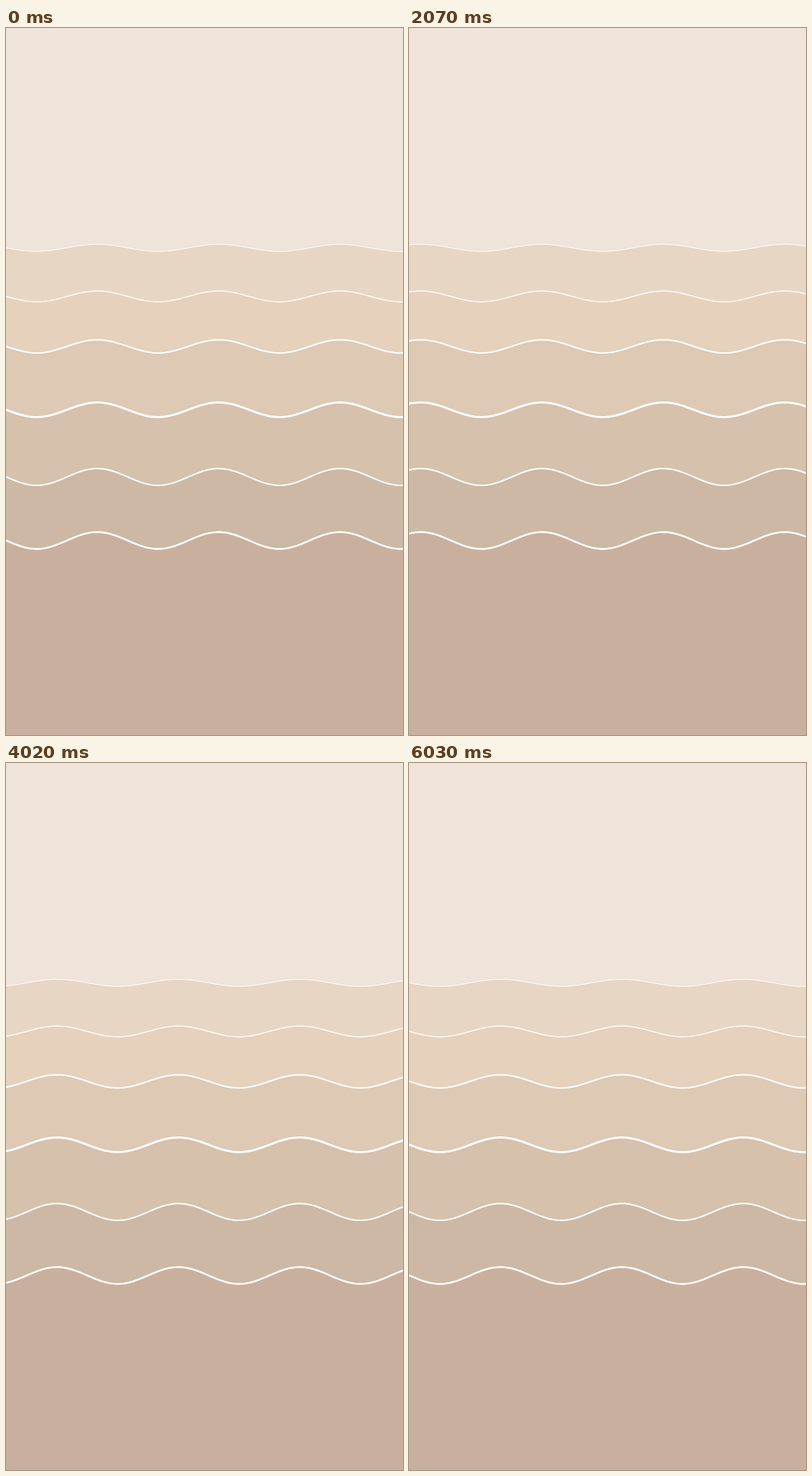
An HTML page for the animation above (6.06 s loop, 540 by 960 pixels).

```html
<!DOCTYPE html>
<html lang="en">
<head>
<meta charset="utf-8">
<title>Sand waves</title>
<style>
  html, body { margin: 0; width: 100%; height: 100%; overflow: hidden; background: #efe3da; }
  svg { display: block; width: 100%; height: 100%; }
</style>
</head>
<body>
<svg id="stage" viewBox="0 0 540 960" preserveAspectRatio="none"></svg>
<script>
const WIDTH = 540, HEIGHT = 960;
const LOOP = 6060, STEP = 30;
const WAVELENGTH = 165.1, FIRST_CREST = 124.2, SPEED = 0.02742;

const layers = [
  { y: 298.5, amp: 4.8,  line: 1,   fill: '#e8d6c4' },
  { y: 364.5, amp: 7.3,  line: 1.4, fill: '#e5d1bc' },
  { y: 432.3, amp: 8.9,  line: 2,   fill: '#ddc9b4' },
  { y: 518.4, amp: 9.9,  line: 2.8, fill: '#d5c1ac' },
  { y: 609.6, amp: 11.4, line: 2,   fill: '#ccb8a4' },
  { y: 695.9, amp: 11.4, line: 2.4, fill: '#c9b09e' }
];

const stage = document.getElementById('stage');

function addPath(attrs) {
  const path = document.createElementNS('http://www.w3.org/2000/svg', 'path');
  for (const name in attrs) path.setAttribute(name, attrs[name]);
  return stage.appendChild(path);
}

for (const layer of layers) {
  layer.area = addPath({ fill: layer.fill });
  layer.crest = addPath({ fill: 'none', stroke: '#fff', 'stroke-width': layer.line });
}

function wavePath({ y, amp }, shift) {
  const points = [];
  for (let x = -6; x <= WIDTH + 6; x += 3) {
    const phase = (x - FIRST_CREST - shift) / WAVELENGTH * 2 * Math.PI;
    points.push(x + ' ' + (y - amp * Math.cos(phase)).toFixed(2));
  }
  return 'M' + points.join('L');
}

function draw(time) {
  const shift = Math.floor((time % LOOP) / STEP) * STEP * SPEED;
  for (const layer of layers) {
    const d = wavePath(layer, shift);
    layer.crest.setAttribute('d', d);
    layer.area.setAttribute('d', `${d}V${HEIGHT}H-6Z`);
  }
}

const start = performance.now();
function tick() {
  draw(performance.now() - start);
  requestAnimationFrame(tick);
}
tick();
</script>
</body>
</html>
```
